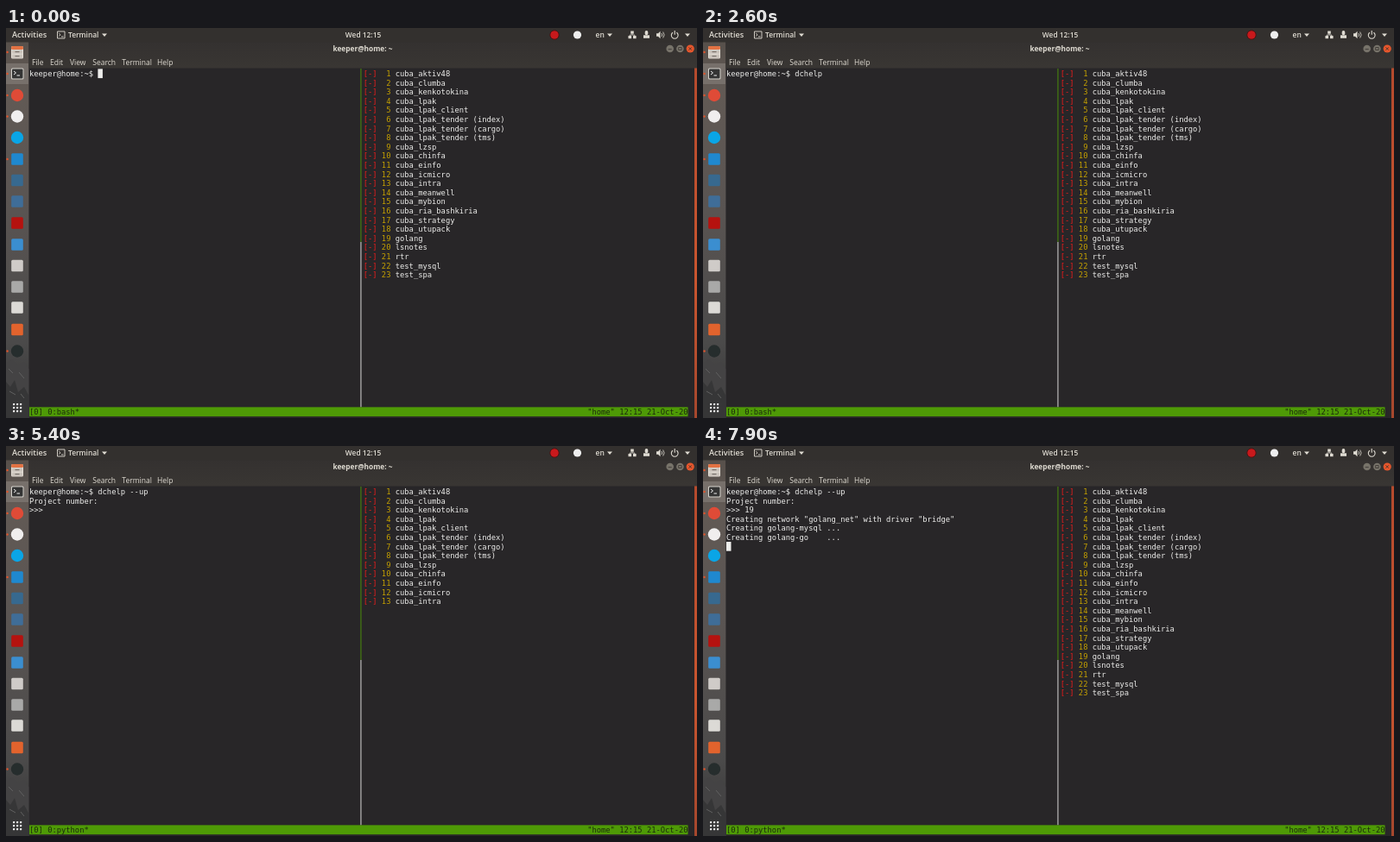
An HTML page for the animation above (8 s loop, 800x452 px).

```html
<!DOCTYPE html>
<html lang="en">
<head>
<meta charset="utf-8">
<title>Terminal</title>
<style>
  html, body { margin: 0; width: 100%; height: 100%; overflow: hidden; background: #282628; }
  svg { display: block; width: 800px; height: 452px; }
  text { white-space: pre; }
  .mono { font: 8.79px "DejaVu Sans Mono", monospace; }
  .ui { font: 8.5px "Open Sans", "Noto Sans", sans-serif; fill: #dfdbd2; }
  .bar { font-weight: 600; }
</style>
</head>
<body>
<svg id="stage" viewBox="0 0 800 452" xmlns="http://www.w3.org/2000/svg">
  <defs>
    <linearGradient id="dock" x1="0" y1="0" x2="0" y2="1">
      <stop offset="0" stop-color="#57504b"/>
      <stop offset=".12" stop-color="#625a55"/>
      <stop offset=".45" stop-color="#595452"/>
      <stop offset=".8" stop-color="#4b4a4a"/>
      <stop offset="1" stop-color="#333334"/>
    </linearGradient>
    <linearGradient id="edge" x1="0" y1="0" x2="0" y2="1">
      <stop offset="0" stop-color="#b54a2d"/>
      <stop offset=".6" stop-color="#c9552f"/>
      <stop offset="1" stop-color="#a5472d"/>
    </linearGradient>
    <linearGradient id="head" x1="0" y1="0" x2="0" y2="1">
      <stop offset="0" stop-color="#343130"/>
      <stop offset="1" stop-color="#393633"/>
    </linearGradient>
  </defs>

  <!-- desktop, window and bars -->
  <rect width="800" height="452" fill="#282628"/>
  <rect y="16" width="26.4" height="436" fill="url(#dock)"/>
  <path d="M0 388l7 -4 6 7 8 -4 5.4 8v57H0z" fill="#444344"/>
  <path d="M0 410l5 6 5 -8 4 14 7 -6 5.4 10v26H0z" fill="#363637"/>
  <path d="M3 395l5 5M15 399l6 7M4 421l7 4M17 424l4 5" stroke="#606060"/>
  <rect x="797" y="46" width="3" height="406" fill="url(#edge)"/>
  <rect x="26.4" y="16" width="773.6" height="30.5" fill="url(#head)"/>
  <rect width="800" height="16.5" fill="#33302e"/>

  <!-- top bar -->
  <g class="ui bar">
    <text x="7" y="11" style="font-size:9.2px">Activities</text>
    <text x="72" y="11" style="font-size:8.4px">Terminal</text>
    <text x="413.5" y="11" text-anchor="middle" style="font-size:8.4px">Wed 12:15</text>
    <text x="682.5" y="11">en</text>
    <text x="413" y="27" text-anchor="middle" style="font-weight:700;font-size:8.3px">keeper@home: ~</text>
  </g>
  <g fill="#dfdbd2">
    <path d="M111 6.5h6l-3 3.5zM696 6.5h6l-3 3.5zM786 6.5h6l-3 3.5z"/>
    <path d="M59.5 4h8.5v8h-8.5zM61.3 6.2l1.8 1.6 -1.8 1.6M64 10h2.5" fill="none" stroke="#dfdbd2" stroke-width=".9"/>
    <circle cx="661.5" cy="8" r="4.6" fill="#eee"/>
    <rect x="723.2" y="3.5" width="3.6" height="3.2"/>
    <rect x="720.5" y="9" width="3.6" height="3.2"/>
    <rect x="726" y="9" width="3.6" height="3.2"/>
    <path d="M725 6.5v1.5M722.3 9V8h5.5v1" fill="none" stroke="#dfdbd2" stroke-width=".8"/>
    <rect x="739.7" y="3" width="3.6" height="5.2" rx="1.8"/>
    <path d="M738 11.8v-3.5h7v3.5z"/>
    <path d="M753 6.3h2l2.5 -2.6v8.6L755 9.8h-2z"/>
    <path d="M759 6q1.5 2 0 4M760.7 4.5q2.8 3.5 0 7" fill="none" stroke="#dfdbd2" stroke-width=".8"/>
    <path d="M772 5.2a3.9 3.9 0 1 0 4.4 0M774.2 3v4.7" fill="none" stroke="#dfdbd2" stroke-width="1.1"/>
  </g>
  <circle cx="635" cy="8" r="5.2" fill="#c8191c" stroke="#4a1414"/>

  <!-- window buttons -->
  <g stroke-width=".8" fill="none">
    <circle cx="768.7" cy="24" r="4.3" fill="#77736a"/>
    <circle cx="780.4" cy="24" r="4.3" fill="#77736a"/>
    <circle cx="792.2" cy="24" r="4.6" fill="#e6562c"/>
    <path d="M766.7 24.6h4M778.7 22.5h3.4v3h-3.4zM790.5 22.3l3.4 3.4M793.9 22.3l-3.4 3.4" stroke="#36322e"/>
  </g>
  <g class="ui" id="menu"></g>
  <g id="icons"></g>

  <!-- panes -->
  <rect x="410.5" y="47" width=".9" height="201" fill="#4e9a06"/>
  <rect x="410.5" y="248" width=".9" height="191.5" fill="#eeeeec"/>
  <rect x="27" y="439.4" width="762.5" height="10.8" fill="#4e9a06"/>
  <g class="mono" fill="#eeeeec">
    <g id="list"></g>
    <g id="shell"></g>
    <g fill="#1b2a0c">
      <text id="status" x="27" y="448"></text>
      <text x="673.2" y="448">"home" 12:15 21-Oct-20</text>
    </g>
  </g>
  <rect id="cursor" width="5.5" height="10.7" fill="#eeeeec"/>
</svg>
<script>
const LOOP = 8000, TICK = 100, BLINK = 600;
const CELL = 5.292, LINE = 10.6, LEFT = 27, RIGHT = 413.7, TOP = 47.4, BASE = 55.9;
const PROMPT = 'keeper@home:~$ ';
const $ = id => document.getElementById(id);

function add(parent, tag, attrs, text) {
  const el = document.createElementNS('http://www.w3.org/2000/svg', tag);
  for (const k in attrs) el.setAttribute(k, attrs[k]);
  if (text !== undefined) el.textContent = text;
  return parent.appendChild(el);
}

// [time, text]: typed keys and program output
const KEYS = [
  [-200, ''],
  [1300, 'd'], [1400, 'c'], [1500, 'h'], [1600, 'e'], [1800, 'l'], [1900, 'p'],
  [3600, ' '], [3700, '-'], [3800, '-'], [4000, 'u'], [4100, 'p'], [4300, '\n'],
  [5600, '1'], [5800, '9'], [6300, '\n']
];
const OUTPUT = [
  [4600, 'Project number:\n>>> '],
  [7000, 'Creating network "golang_net" with driver "bridge"\n'],
  [7500, 'Creating golang-mysql ...\n'],
  [7600, 'Creating golang-go    ...\n']
];
const EVENTS = [...KEYS, ...OUTPUT].sort((a, b) => a[0] - b[0]);
const REFRESH = 4250, RENAME = 5000;

const PROJECTS = ('cuba_aktiv48,cuba_clumba,cuba_kenkotokina,cuba_lpak,cuba_lpak_client,' +
  'cuba_lpak_tender (index),cuba_lpak_tender (cargo),cuba_lpak_tender (tms),cuba_lzsp,' +
  'cuba_chinfa,cuba_einfo,cuba_icmicro,cuba_intra,cuba_meanwell,cuba_mybion,' +
  'cuba_ria_bashkiria,cuba_strategy,cuba_utupack,golang,lsnotes,rtr,test_mysql,test_spa').split(',');

const rows = PROJECTS.map((name, i) => {
  const row = add($('list'), 'g', {});
  const put = (col, fill, s) => add(row, 'text', { x: RIGHT + col * CELL, y: BASE + i * LINE, fill }, s);
  put(0, '#f01c1c', '[-]');
  put(i < 9 ? 5 : 4, '#c4a000', i + 1);
  put(7, '#eeeeec', name);
  return row;
});

const lines = Array.from({ length: 7 }, (_, i) =>
  add($('shell'), 'text', { x: LEFT, y: BASE + i * LINE }));

[['File', 30], ['Edit', 51], ['View', 74], ['Search', 100.3], ['Terminal', 134.3], ['Help', 175]]
  .forEach(([s, x]) => add($('menu'), 'text', { x, y: 43 }, s));

// dock
const icons = $('icons');
const box = (x, y, width, height, fill, rx = 0) => add(icons, 'rect', { x, y, width, height, fill, rx });
const dot = (cx, cy, r, fill) => add(icons, 'circle', { cx, cy, r, fill });

box(0, 41, 26, 24, '#77706b');
box(6, 21, 14, 14.5, '#e4ded6', 1.5);
box(6, 21, 14, 4, '#e27243', 1.5);
box(7, 25.5, 12, 4.2, '#cbc4bc');
box(7, 30.6, 12, 4.2, '#cbc4bc');
box(10.5, 27, 5, 1.2, '#77716b');
box(10.5, 32, 5, 1.2, '#77716b');
box(6, 46.5, 14.5, 13, '#d5d2cc', 1.5);
box(7, 47.5, 12.5, 11, '#343434', 1);
add(icons, 'path', { d: 'M9 50l2.5 2 -2.5 2M12.5 55h3.5', fill: 'none', stroke: '#eee' });

// [y, colour, round]
[[78, '#df4b37', 1], [102.5, '#f0eeee', 1], [127, '#0aa5e6', 1], [152, '#1f88cf'],
 [176.5, '#37698f'], [201, '#3f6d98'], [226, '#b5120f'], [251, '#3b8ed0'],
 [275.5, '#cfcbc8'], [300, '#a9a9a8'], [324, '#dcdad6'], [349.5, '#e2632d'], [374.5, '#262d2d', 1]]
  .forEach(([y, fill, round]) => round ? dot(13, y, 7.2, fill) : box(6.2, y - 6.8, 13.6, 13.6, fill, 1.5));
[28, 53, 78, 102.5, 152, 374.5].forEach(y => dot(1.6, y, 1.2, '#e0532b'));
for (let i = 0; i < 9; i++) box(8 + (i % 3) * 4, 435 + Math.floor(i / 3) * 4, 2.2, 2.2, '#eee', 0.4);

function render(t) {
  const text = PROMPT + EVENTS.filter(e => e[0] <= t).map(e => e[1]).join('');
  const parts = text.split('\n');
  lines.forEach((el, i) => { el.textContent = parts[i] || ''; });

  const lastKey = KEYS.filter(k => k[0] <= t).pop()[0];
  const cursor = $('cursor');
  cursor.setAttribute('x', LEFT + parts[parts.length - 1].length * CELL);
  cursor.setAttribute('y', TOP + (parts.length - 1) * LINE);
  cursor.style.display = Math.floor((t - lastKey) / BLINK) % 2 ? 'none' : '';

  const shown = t < REFRESH ? rows.length : Math.floor(7.3 + (t - 4800) / 93);
  rows.forEach((row, i) => { row.style.display = i < shown ? '' : 'none'; });
  $('status').textContent = t < RENAME ? '[0] 0:bash*' : '[0] 0:python*';
}

const start = performance.now();
function frame() {
  const t = (performance.now() - start) % LOOP;
  render(Math.floor(t / TICK) * TICK);
  requestAnimationFrame(frame);
}
frame();
</script>
</body>
</html>
```
